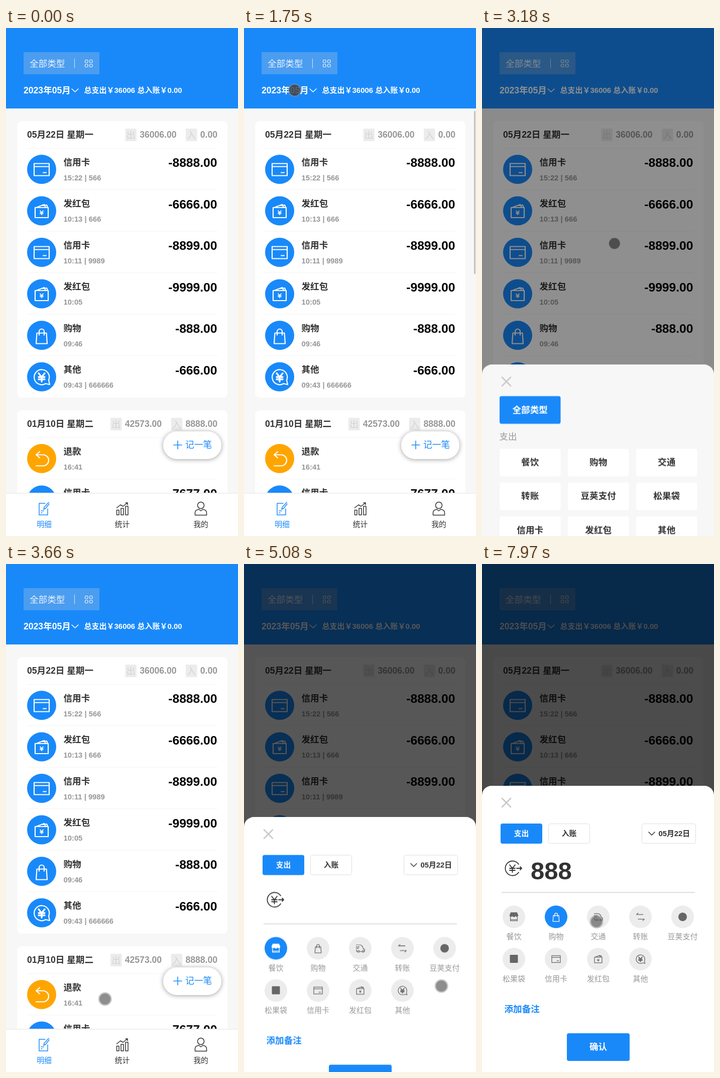
Write an HTML page that moves like this. It is 462 px wide and 1010 px high and loops after 8 s.

```html
<!DOCTYPE html>
<html lang="zh-CN">
<head>
<meta charset="utf-8">
<title>记账</title>
<style>
  html, body { margin: 0; width: 100%; height: 100%; overflow: hidden; background: #f7f7f7; }
  svg { display: block; width: 100vw; height: 100vh; }
  text { font-family: 'Liberation Sans', 'Noto Sans CJK SC', 'Noto Sans CJK', sans-serif; white-space: pre; }
  .bold { font-weight: 700; }
  .fab { filter: drop-shadow(0 1px 5px rgba(0, 0, 0, .38)); }
  .icon { fill: none; stroke: currentColor; stroke-linecap: round; stroke-linejoin: round; }
</style>
</head>
<body>
<script>
const LOOP = 8000;
const BLUE = '#1989fa', DARK = '#323233', GRAY = '#969799', LINE = '#dcdee0';

const text = (x, y, s, size, fill, attrs = '') =>
  `<text x="${x}" y="${Math.floor(y)}" font-size="${size}" fill="${fill}" ${attrs}>${s}</text>`;
const bold = (x, y, s, size, fill, attrs = '') => text(x, y, s, size, fill, `class="bold" ${attrs}`);
const rect = (x, y, w, h, fill, r = 0, attrs = '') =>
  `<rect x="${x}" y="${y}" width="${w}" height="${h}" rx="${r}" fill="${fill}" ${attrs}/>`;
const stroke = (d, color, width = 1.5, attrs = '') =>
  `<path class="icon" d="${d}" color="${color}" stroke-width="${width}" ${attrs}/>`;
const MID = 'text-anchor="middle"', END = 'text-anchor="end"';

const YUAN = 'M-4-5L0 0 4-5M0 0V6M-4 0H4M-4 3H4';
const line = (d, extra = '') => `<path class="icon" d="${d}"/>${extra}`;
const yuan = (y, scale) => `<path class="icon" transform="translate(0 ${y}) scale(${scale})" d="${YUAN}"/>`;
const icons = {
  card: line('M-15-12H15V12H-15ZM-15-6H15M3 6H9'),
  packet: line('M-13-7H13V13H-13ZM-11-7L5-13 8-7M2-11L10-12 12-7', yuan(3, .75)),
  bag: line('M-9.5-5H9.5L11 16H-11ZM-5-1V-8a5 5 0 0 1 10 0V-1'),
  other: line('M14 6L16 15 8 13A15 15 0 1 1 14 6', yuan(0, 1.5)),
  refund: line('M-4-14L-11-8-4-2M-11-8H3a11 11 0 0 1 0 22H-11'),
  food: '<path fill="currentColor" d="M-11-16H11L15-6A5 5 0 0 1 5-4 5 5 0 0 1-5-4 5 5 0 0 1-15-6Z"/>'
    + line('M-12 1V14H12V1M-12 10H12'),
  truck: line('M-14-11H2L8-6 11 3H15V11H13M7 11H-3M-9 11H-13V5M-14-5H-3M-14 0H-6',
    '<circle class="icon" cx="-6" cy="11" r="3"/><circle class="icon" cx="10" cy="11" r="3"/>'),
  transfer: line('M-8-13L-14-8H9M8 13L14 8H-8'),
  dot: '<circle r="15" fill="currentColor"/>',
  square: '<rect x="-14" y="-15" width="28" height="28" rx="2" fill="currentColor"/>',
};
const icon = (name, x, y, color, scale = 1) =>
  `<g transform="translate(${x} ${y}) scale(${scale})" color="${color}" stroke-width="2.2">${icons[name]}</g>`;

const badge = (x, y, s) => rect(x, y, 22.5, 25, '#ececec', 2) + text(x + 11.2, y + 19, s, 17.6, '#d2d3d5', MID);

function row(y, [name, title, sub, amount], last) {
  const fill = name === 'refund' ? '#ffa500' : BLUE;
  return `<circle cx="71" cy="${y}" r="29" fill="${fill}"/>` + icon(name, 71, y + .5, '#fff')
    + bold(114.5, y - 8, title, 17.6, DARK) + bold(114.5, y + 22, sub, 14.8, GRAY)
    + bold(420.5, y - 4.5, amount, 24.64, '#000', END)
    + (last ? '' : rect(42, y + 40, 379, 1, '#f3f4f5'));
}

function card(top, date, out, income, rows) {
  const width = s => (s.length * .5562 - .278) * 17.6;
  const inBadge = 421 - width(income) - 28.7;
  const outEnd = inBadge - 18.5;
  return rect(22, top, 419, rows.length * 82.5 + 55, '#fff', 9)
    + bold(42, top + 33, date, 17.6, DARK)
    + badge(outEnd - width(out) - 28.7, top + 15, '出') + bold(outEnd, top + 33, out, 17.6, GRAY, END)
    + badge(inBadge, top + 15, '入') + bold(421, top + 33, income, 17.6, GRAY, END)
    + rect(42, top + 54, 379, 1, '#f3f4f5')
    + rows.map((r, i) => row(top + 96 + i * 82.5, r, i === rows.length - 1)).join('');
}

const list = card(185, '05月22日 星期一', '36006.00', '0.00', [
  ['card', '信用卡', '15:22 | 566', '-8888.00'],
  ['packet', '发红包', '10:13 | 666', '-6666.00'],
  ['card', '信用卡', '10:11 | 9989', '-8899.00'],
  ['packet', '发红包', '10:05', '-9999.00'],
  ['bag', '购物', '09:46', '-888.00'],
  ['other', '其他', '09:43 | 666666', '-666.00'],
]) + card(760, '01月10日 星期二', '42573.00', '8888.00', [
  ['refund', '退款', '16:41', '+8888.00'],
  ['card', '信用卡', '16:40', '-7677.00'],
  ['bag', '购物', '16:38', '-8899.00'],
  ['packet', '发红包', '16:35', '-9999.00'],
  ['other', '其他', '16:32', '-7999.00'],
  ['card', '信用卡', '16:30', '-7999.00'],
]);

const header = rect(0, 0, 462, 160, BLUE) + rect(35, 48, 151, 44, '#4b9df0')
  + text(47, 77, '全部类型', 17.6, '#eef5fd') + rect(136, 61, 1, 19, 'rgba(255,255,255,.75)')
  + [[157.5, 63.5], [166.5, 63.5], [157.5, 72], [166.5, 72]]
    .map(([x, y]) => rect(x, y, 5.5, 5.5, 'none', 1.5, 'stroke="#eef5fd" stroke-width="1.2"')).join('')
  + bold(35, 130, '2023年05月', 17.6, '#fff') + stroke('M131 121L137.5 127 144 121', '#fff', 1.6)
  + bold(155.5, 129, '总支出￥36006 总入账￥0.00', 15, '#fff');

const fab = rect(313, 802, 116, 55, '#fff', 27.5, 'class="fab"')
  + stroke('M334 829H350M342 821V837', BLUE, 1.6) + text(357, 835, '记一笔', 17.8, BLUE);

const nav = rect(0, 924, 462, 2, '#f0f0f1') + rect(0, 926, 462, 84, '#fff')
  + stroke('M78 945H66V968H83V956M85 943L76 953 75 957 79 955 86 946M70 960H75M70 964H72', BLUE)
  + stroke('M220.5 958.5H225V968H220.5ZM229 955H234V968H229ZM238 951H243V968H238ZM220.5 954L228 948 233 951 242 944M238 944H242V948', DARK)
  + stroke('M394.5 949a6.5 6.5 0 1 1-13 0a6.5 6.5 0 1 1 13 0M376.5 968.5V964Q376.5 958 384 957L388 960 392 957Q399.5 958 399.5 964V968.5Z', DARK)
  + [['明细', 76, BLUE], ['统计', 231.5, DARK], ['我的', 388, DARK]]
    .map(([s, x, c]) => text(x, 992, s, 14.8, c, MID)).join('');

const panel = fill => rect(0, 441, 462, 600, fill, 19) + stroke('M40 466L57 483M57 466L40 483', '#c8c9cc', 2.6);

const choice = (s, x, y, fill, color) =>
  rect(x, y, 121.5, 55, fill, 4) + bold(x + 60.7, y + 33.5, s, 17.6, color, MID);
const choices = (top, names) =>
  names.map((s, i) => choice(s, 35 + i % 3 * 136, top + Math.floor(i / 3) * 67.3, '#fff', DARK)).join('');

const typeSheet = panel('#f7f7f7') + choice('全部类型', 35, 503.5, BLUE, '#fff')
  + text(34.5, 590, '支出', 17.6, GRAY)
  + choices(608, ['餐饮', '购物', '交通', '转账', '豆荚支付', '松果袋', '信用卡', '发红包', '其他'])
  + text(34.5, 829.5, '入账', 17.6, GRAY)
  + choices(847, ['退款', '工资', '收红包', '收转账', '其他人情', '其他']);

const items = [['food', '餐饮'], ['bag', '购物'], ['truck', '交通'], ['transfer', '转账'], ['dot', '豆荚支付'],
  ['square', '松果袋'], ['card', '信用卡'], ['packet', '发红包'], ['other', '其他']]
  .map(([name, label], i) => {
    const x = 63.5 + i % 5 * 84, y = 701.5 + Math.floor(i / 5) * 84;
    return `<g class="item-${name}" fill="#ececec" color="#666"><circle cx="${x}" cy="${y}" r="22.5"/>`
      + icon(name, x, y, 'inherit', .57) + text(x, y + 44.5, label, 15, GRAY, MID) + '</g>';
  }).join('');

const outlined = `stroke="${LINE}"`;
const entrySheet = panel('#fff') + rect(37, 516, 83, 40, BLUE, 4) + bold(78.5, 541.5, '支出', 14.8, '#fff', MID)
  + rect(132.5, 516.5, 82, 39, '#fff', 4, outlined) + bold(173.5, 541.5, '入账', 14.8, DARK, MID)
  + rect(318.5, 516.5, 107, 39, '#fff', 4, outlined) + stroke('M332 533L338 539 344 533', DARK)
  + bold(351.5, 541, '05月22日', 14.8, DARK)
  + stroke('M73 597A14.5 14.5 0 1 0 73 613M69 605H79M76 602L79 605 76 608', DARK, 1.8)
  + stroke(YUAN, DARK, 1.4, 'transform="translate(60.5 605) scale(1.35)"')
  + bold(97, 627, [1, 2, 3].map(n => `<tspan class="digit${n}">8</tspan>`).join(''), 49, DARK)
  + rect(39, 652, 385, 2, LINE) + items
  + bold(44.5, 891, '添加备注', 17.6, BLUE)
  + rect(169, 933, 125, 55, BLUE, 4) + bold(231.5, 966.5, '确认', 17.6, '#fff', MID);

document.body.innerHTML = `<svg viewBox="0 0 462 1010" preserveAspectRatio="none">
  <clipPath id="view"><rect y="160" width="462" height="764"/></clipPath>
  ${rect(0, 0, 462, 1010, '#f7f7f7')}
  <g clip-path="url(#view)"><g class="list">${list}</g></g>
  <g class="bar">${rect(458, 165, 3, 324, '#c1c1c1', 1, 'class="thumb"')}</g>
  ${header}${fab}${nav}
  ${rect(0, 0, 462, 1010, '#000', 0, 'class="shade"')}
  <g class="types">${typeSheet}</g><g class="entry">${entrySheet}</g>
  <g class="cursor"><circle class="ring" r="13.5"/><circle class="disc" r="11"/></g>
</svg>`;

// Each stop is [ms, declarations, easing until the next stop].
const sheet = document.head.appendChild(document.createElement('style'));
function animate(name, stops, easing = 'linear') {
  const frames = stops.map(([ms, css, ease = easing]) =>
    `${ms / LOOP * 100}% { ${css}; animation-timing-function: ${ease}; }`).join('\n');
  sheet.textContent += `@keyframes ${name} { ${frames} }
    .${name} { animation: ${name} ${LOOP}ms infinite; }\n`;
}
const shiftY = y => `transform: translate(0px, ${y}px)`;
const opacity = v => `opacity: ${v}`;

const scroll = far => [[0, shiftY(0)], [130, shiftY(0), 'ease-out'], [850, shiftY(far)],
  [1020, shiftY(far), 'ease-out'], [1600, shiftY(0)], [LOOP, shiftY(0)]];
animate('list', scroll(-380));
animate('thumb', scroll(161));
animate('bar', [[0, opacity(0), 'step-end'], [130, opacity(1)], [1890, opacity(1)], [2150, opacity(0)], [LOOP, opacity(0)]]);

// Sheets ease out on entry and in on exit; the shade starts slightly before them.
const SLIDE = 300, LEAD = 25;
const TYPES_IN = 2189, TYPES_OUT = 3008, ENTRY_IN = 4863;
const enter = (ms, from, to) => [[ms, from, 'ease-out'], [ms + SLIDE, to]];
const leave = (ms, from, to) => [[ms, from, 'ease-in'], [ms + SLIDE, to]];
const HIDDEN = shiftY(569), SHOWN = shiftY(0), CLEAR = opacity(0), DIM = opacity(.7);
animate('types', [[0, HIDDEN], ...enter(TYPES_IN, HIDDEN, SHOWN), ...leave(TYPES_OUT, SHOWN, HIDDEN), [LOOP, HIDDEN]]);
animate('entry', [[0, HIDDEN], ...enter(ENTRY_IN, HIDDEN, SHOWN), [LOOP, SHOWN]]);
animate('shade', [[0, CLEAR], ...enter(TYPES_IN - LEAD, CLEAR, DIM), ...leave(TYPES_OUT + 8, DIM, CLEAR),
  ...enter(ENTRY_IN - LEAD, CLEAR, DIM), [LOOP, DIM]]);

[6100, 6300, 6820].forEach((ms, i) => animate(`digit${i + 1}`,
  [[0, 'fill: transparent'], [ms, `fill: ${DARK}`], [LOOP, `fill: ${DARK}`]], 'step-end'));

const ON = `fill: ${BLUE}; color: #fff`, OFF = 'fill: #ececec; color: #666';
animate('item-food', [[0, ON], [7750, OFF], [LOOP, OFF]], 'step-end');
animate('item-bag', [[0, OFF], [7750, ON], [LOOP, ON]], 'step-end');

const path = [[0, -40, 640], [129, -40, 640], [130, 230, 640], [750, 235, 300], [1020, 230, 330], [1450, 205, 565],
  [1700, 101, 126], [1750, 101, 124], [1820, 95, 102], [2100, 85, 74], [2180, 85, 74], [2410, 209, 408],
  [3000, 264, 427], [3180, 264, 427], [3330, 230, 630], [3520, 187, 810], [3700, 200, 880], [3850, 240, 907],
  [4100, 310, 870], [4360, 366, 830], [4600, 403, 852], [5000, 403, 852], [5080, 394, 840], [5210, 278, 716],
  [5600, 200, 650], [6030, 142, 618], [6300, 142, 618], [6620, 146, 622], [6820, 146, 622], [7050, 190, 720],
  [7250, 235, 837], [7570, 165, 742], [7700, 148, 708], [7780, 148, 708], [7970, 228, 711], [LOOP, 228, 711]];
animate('cursor', path.map(([ms, x, y]) => [ms, `transform: translate(${x}px, ${y}px)`]));

const IDLE = 'fill: rgba(70,70,70,.45)', PRESSED = 'fill: rgba(50,50,50,.7)', CLICK = 'fill: rgba(165,165,10,.7)';
animate('disc', [[0, PRESSED], [1820, IDLE], [2340, PRESSED], [3250, IDLE], [4680, CLICK], [4880, IDLE], [LOOP, IDLE]], 'step-end');
const RING = 'fill: rgba(145,145,145,.5)', GLOW = 'fill: rgba(195,195,20,.75)';
animate('ring', [[0, RING], [4680, GLOW], [4880, RING], [LOOP, RING]], 'step-end');
</script>
</body>
</html>
```
